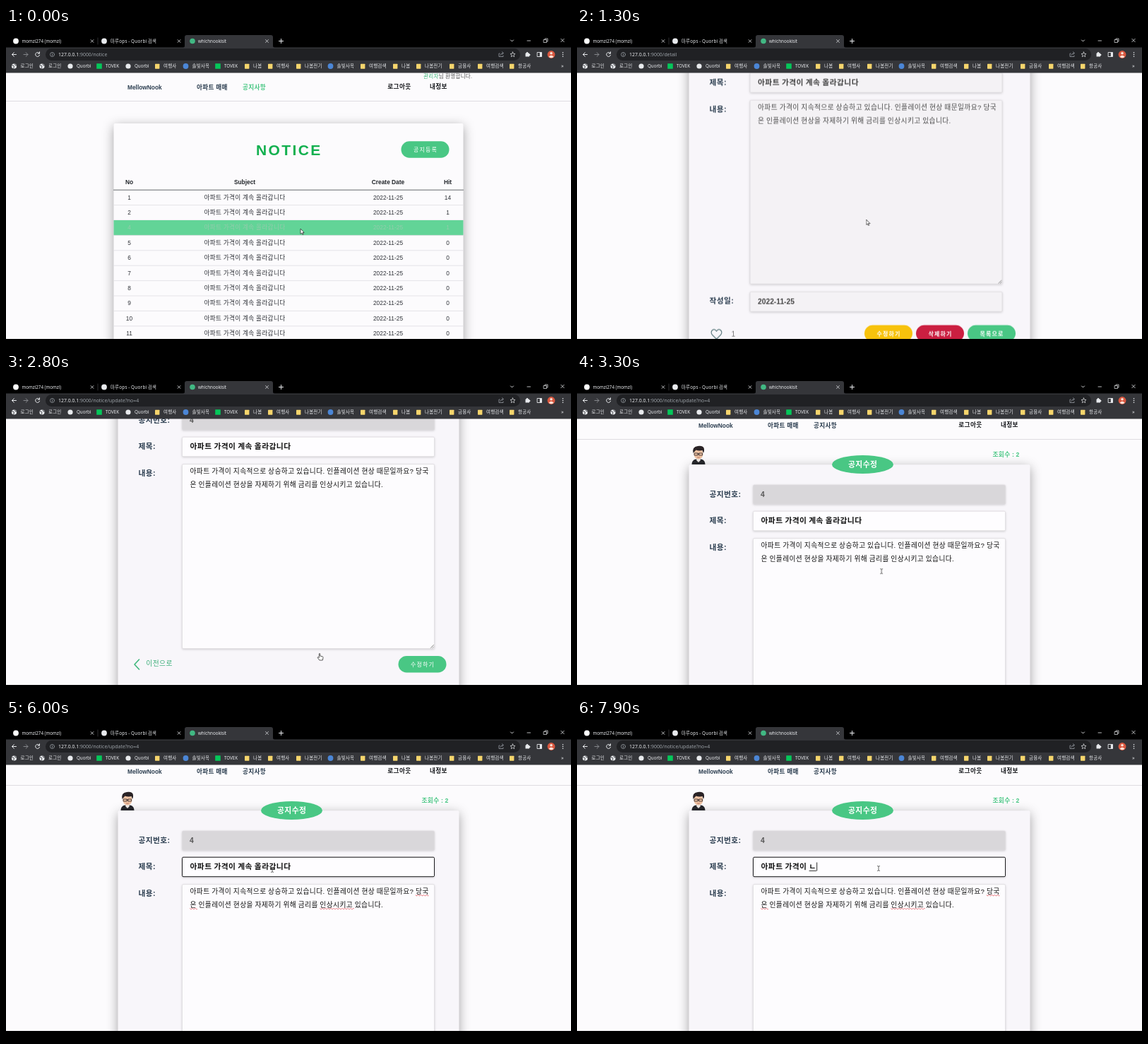
Animation of 800x450 px, one loop 8000 ms. Source, as an HTML page:

```html
<!DOCTYPE html>
<html lang="ko">
<head>
<meta charset="utf-8">
<title>Notice board</title>
<style>
html, body { margin: 0; width: 100%; height: 100%; overflow: hidden; background: #000; }
svg { display: block; }
text { font-family: "Liberation Sans", "Noto Sans CJK KR", "Noto Sans CJK JP", sans-serif; white-space: pre; }
.chrome text { font-family: "Noto Sans", "Noto Sans CJK KR", "Noto Sans CJK JP", sans-serif; }
.ko { letter-spacing: .04em; word-spacing: -.05em; }
.b { font-weight: 700; }
.mid { text-anchor: middle; }
.line { fill: none; stroke-linecap: round; stroke-linejoin: round; }
.card { filter: drop-shadow(0 4px 8px rgba(0, 0, 0, .36)); }
.field { stroke: #dddbdf; stroke-width: .8; filter: drop-shadow(0 1.5px 1.5px rgba(0, 0, 0, .16)); }
.focus { fill: none; stroke: #1c1c1e; stroke-width: 1; }

.list, .detail, .edit, .arrow, .hand, .beam, .title-focus, .body-focus, .caret, .advance, .cover, .jamo, .spell
  { animation: 8s step-end infinite; }
.list { animation-name: list; }
.detail { animation-name: detail; }
.edit { animation-name: edit; }
.arrow { animation-name: arrow; }
.hand { animation-name: hand; }
.beam { animation-name: beam; }
.title-focus { animation-name: title-focus; }
.body-focus { animation-name: body-focus; }
.caret { animation-name: caret; }
.advance { animation-name: advance; }
.cover { animation-name: cover; }
.jamo { animation-name: jamo; }
.spell { animation-name: spell; }
.scroll { animation: scroll 8s ease-in-out infinite; }
.cursor { animation: cursor 8s ease-in-out infinite; }

@keyframes list { 0% { opacity: 1 } 4.4%, 100% { opacity: 0 } }
@keyframes detail { 0% { opacity: 0 } 4.4% { opacity: 1 } 34.9%, 100% { opacity: 0 } }
@keyframes edit { 0% { opacity: 0 } 34.9%, 100% { opacity: 1 } }
@keyframes arrow { 0% { opacity: 1 } 23.7%, 100% { opacity: 0 } }
@keyframes hand { 0% { opacity: 0 } 23.7% { opacity: 1 } 37.4%, 100% { opacity: 0 } }
@keyframes beam { 0% { opacity: 0 } 37.4%, 100% { opacity: 1 } }
@keyframes title-focus { 0% { opacity: 0 } 48.7% { opacity: 1 } 62.4% { opacity: 0 } 71.2%, 100% { opacity: 1 } }
@keyframes body-focus { 0% { opacity: 0 } 62.4% { opacity: 1 } 71.2%, 100% { opacity: 0 } }
@keyframes spell { 0% { opacity: 0 } 63.7%, 100% { opacity: 1 } }
@keyframes jamo { 0% { opacity: 0 } 96.2%, 100% { opacity: 1 } }
@keyframes advance { 0% { transform: translateX(0) } 96.2%, 100% { transform: translateX(10.4px) } }
@keyframes caret {
  0% { opacity: 0 } 48.7% { opacity: 1 } 54% { opacity: 0 } 57% { opacity: 1 }
  62.4% { opacity: 0 } 79.9%, 100% { opacity: 1 }
}
@keyframes cover {
  0% { transform: translateX(0) }
  82.4% { transform: translateX(-10.4px) }
  83.7% { transform: translateX(-20.7px) }
  84.9% { transform: translateX(-31.1px) }
  86.2% { transform: translateX(-41.5px) }
  87.4% { transform: translateX(-51.9px) }
  88.7% { transform: translateX(-54.7px) }
  89.9% { transform: translateX(-65.1px) }
  91.2%, 100% { transform: translateX(-75.5px) }
}
@keyframes scroll {
  0%, 13.75% { transform: translateY(0) }
  17.5%, 34.89% { transform: translateY(-135px) }
  34.9%, 37.5% { transform: translateY(-116px) }
  41.25%, 100% { transform: translateY(-11px) }
}
@keyframes cursor {
  0%, 5% { transform: translate(417px, 284px) }
  9.4%, 11.2% { transform: translate(250.5px, 121px) }
  14.4%, 18.8% { transform: translate(409.5px, 271px) }
  24.4%, 36% { transform: translate(444px, 395px) }
  45%, 57.5% { transform: translate(424px, 215px) }
  61.9%, 66.9% { transform: translate(420px, 262px) }
  72.5%, 75.6% { transform: translate(377px, 212px) }
  79.4%, 100% { transform: translate(427px, 210px) }
}
</style>
</head>
<body>
<svg id="stage" width="800" height="450" viewBox="0 0 800 450"></svg>
<script>
const GREEN = '#49c784', INK = '#2c3e50', PAGE = '#fcfbfd', LIGHT = '#e8eaed', DIM = '#9aa0a6';
const TITLE = '아파트 가격이 계속 올라갑니다';
const BODY = [
  '아파트 가격이 지속적으로 상승하고 있습니다. 인플레이션 현상 때문일까요? 당국',
  '은 인플레이션 현상을 자제하기 위해 금리를 인상시키고 있습니다.'
];

// Hangul is set a little larger so that each syllable advances one em.
const text = (x, y, size, str, fill, cls = '', extra = '') => {
  const ko = /[\u3131-\ud7a3]/.test(str);
  return `<text x="${x}" y="${y}" font-size="${ko ? size * 1.04 : size}" fill="${fill}" class="${cls}${ko ? ' ko' : ''}" ${extra}>${str}</text>`;
};
const rect = (x, y, w, h, fill, r = 0, cls = '') =>
  `<rect x="${x}" y="${y}" width="${w}" height="${h}" rx="${r}" fill="${fill}" class="${cls}"/>`;
const dot = (x, y, r, fill) => `<circle cx="${x}" cy="${y}" r="${r}" fill="${fill}"/>`;
const line = (d, stroke, width = 1) => `<path class="line" d="${d}" stroke="${stroke}" stroke-width="${width}"/>`;
const group = (cls, ...parts) => `<g class="${cls}">${parts.join('')}</g>`;
const cross = (x, y, r) => line(`M${x - r} ${y - r}l${2 * r} ${2 * r}m0 ${-2 * r}l${-2 * r} ${2 * r}`, LIGHT, .8);
const pill = (x, y, fill, label, cls) =>
  rect(x, y, 68, 23.5, fill, 11.75) +
  `<text x="${x + 34.5}" y="${y + 14.9}" font-size="8" fill="#fff" class="mid ${cls}" letter-spacing="1.2">${label}</text>`;
const grip = (x, y) => line(`M${x - 5} ${y - 1}l4-4M${x - 2.5} ${y - 1}l1.5-1.5`, '#555', .7);

const globe = x => dot(x, 54, 3.6, LIGHT) + line(`M${x - 3} 53h2l1 2-1 2M${x + 1} 51l1 2h1.5`, '#35363a', .9);
const folder = x => rect(x - 3, 50.7, 6.4, 7, '#f6d56c', .6);
const plain = x => dot(x, 54, 3.6, LIGHT);
const green = x => rect(x - 3.8, 50.2, 7.6, 7.6, '#05c75a', .5);
const blue = x => dot(x, 54, 3.9, '#4b86d6');

function bookmarks() {
  const items = [
    [globe, 11.5, '로그인'], [globe, 51, '로그인'], [plain, 91, 'Quorbi'], [green, 132, 'TOVEK'],
    [plain, 173, 'Quorbi'], [folder, 214, '여행사'], [blue, 254.5, '솔빛사옥'], [green, 300, 'TOVEK'],
    [folder, 341, '나봄'], [folder, 374, '여행사'], [folder, 414, '나봄전기'], [blue, 459.5, '솔빛사옥'],
    [folder, 505, '여행검색'], [folder, 551, '나봄'], [folder, 584, '나봄전기'], [folder, 631, '금융사'],
    [folder, 671, '여행검색'], [folder, 716, '항공사']
  ];
  return items.map(([icon, x, name]) => icon(x) + text(x + 8.9, 56.4, 6.25, name, LIGHT)).join('') +
    text(786, 56, 7, '»', LIGHT);
}

function browser() {
  const url = (cls, path) => group(cls,
    `<text x="74" y="40" font-size="6.9" fill="${LIGHT}">127.0.0.1<tspan fill="${DIM}">:9000/${path}</tspan></text>`);
  return group('chrome',
    rect(0, 0, 800, 28, '#000'), rect(0, 27.5, 800, 36, '#35363a'),
    '<path d="M250 28q3 0 3-3V13q0-3 3-3h119q3 0 3 3v12q0 3 3 3z" fill="#35363a"/>',
    dot(14, 18.5, 3.9, '#fff'), text(22.5, 20.8, 6.2, 'momzi274 (momzi)', LIGHT), cross(122, 18.5, 1.9),
    line('M130 14v9', '#44464a', .7),
    dot(139, 18.5, 3.9, LIGHT), text(148, 20.8, 6.1, '마루ops - Quorbi 검색', LIGHT), cross(245, 18.5, 1.9),
    dot(264, 18.5, 3.8, '#41b883'), text(272, 20.8, 6.2, 'whichnookisit', LIGHT), cross(369.5, 18.5, 1.9),
    line('M386.5 18.5h6m-3-3v6', LIGHT, 1),
    line('M714.5 17l2 2 2-2', LIGHT, .9), line('M738 18h4.5', LIGHT, .8),
    line('M761.5 16.5h4v4h-4zM763 16.3v-1.3h4v4h-1.2', LIGHT, .7), cross(788, 17.5, 2.2),
    line('M14.5 37.5h-6m2.8-2.8l-2.8 2.8 2.8 2.8', LIGHT, 1),
    line('M25 37.5h6m-2.8-2.8l2.8 2.8-2.8 2.8', '#85878b', 1),
    line('M47 35.5a3 3 0 1 0 .6 2.8M47.5 33.8v2.4h-2.4', LIGHT, 1),
    rect(56, 29, 672, 17, '#202124', 8.5),
    line('M68.5 37.5a3 3 0 1 0-6 0 3 3 0 0 0 6 0M65.5 37.2v1.8M65.5 35.8v.1', DIM, .8),
    url('list', 'notice'), url('detail', 'detail'), url('edit', 'notice/update?no=4'),
    line('M699 36h-1v4.5h6V39M700 38.5q.5-3 4-3m-1.5-1.7l1.8 1.7-1.8 1.7', DIM, .8),
    line('M717.5 34l1 2.3 2.5.2-1.9 1.7.6 2.5-2.2-1.3-2.2 1.3.6-2.5-1.9-1.7 2.5-.2z', LIGHT, .7),
    rect(735.5, 35.5, 5.5, 5, LIGHT, .6), dot(738, 35.2, 1.3, LIGHT), dot(741.2, 38, 1.2, LIGHT),
    line('M752.5 34.5h6v6h-6z', LIGHT, .9), rect(755.8, 34.5, 2.7, 6, LIGHT),
    dot(772, 37.5, 5.4, '#d9573f'), dot(772, 35.8, 1.8, '#fbe3d8'),
    '<path d="M768.5 40.8q3.5-4 7 0-3.5 3-7 0" fill="#fbe3d8"/>',
    [34.8, 37.5, 40.2].map(y => dot(788.5, y, .8, LIGHT)).join(''),
    bookmarks());
}

function navbar() {
  return rect(0, 0, 800, 700, PAGE) +
    line('M0 103.5h800', '#dcdbde', .9) +
    text(172, 86.5, 8.35, 'MellowNook', INK, 'b') +
    text(270, 86.5, 8.3, '아파트 매매', INK, 'b') +
    text(335, 86.5, 8.3, '공지사항', INK, 'b') +
    group('list', rect(333, 77, 38, 13, PAGE), text(335, 86.5, 8.3, '공지사항', GREEN, 'b')) +
    text(591, 71.4, 7.25, `<tspan fill="#3db679">관리자</tspan>님 환영합니다.`, '#555') +
    text(540.3, 85.5, 8.35, '로그아웃', '#16181c', 'b') +
    text(600, 85.5, 8.25, '내정보', '#16181c', 'b');
}

function listPage() {
  const columns = [174.5, 338, 541, 625.5];
  const cells = (y, values, fill, cls) =>
    values.map((v, i) => text(columns[i], y, 8.35, v, fill, `mid ${cls}`)).join('');
  const rows = [1, 2, 4, 5, 6, 7, 8, 9, 10, 11].map((no, i) => {
    const top = 229.2 + 21.4 * i, hot = no === 4;
    const hits = no === 1 ? 14 : no < 5 ? 1 : 0;
    return (hot ? rect(152.5, top, 495, 21.4, '#62d497') : '') +
      line(`M152.5 ${top + 21.4}h495`, '#dfdee2', .8) +
      cells(top + 13.3, [no, TITLE, '2022-11-25', hits], hot ? '#93cbac' : '#2f3238', '');
  });
  return group('list',
    rect(152.5, 135, 495, 500, PAGE, 2, 'card'),
    text(354, 180, 21, 'NOTICE', '#12b04f', 'b', 'letter-spacing="2.4"'),
    pill(559.5, 160.3, GREEN, '공지등록', ''),
    cells(221.3, ['No', 'Subject', 'Create Date', 'Hit'], '#22262b', 'b'),
    ...rows, line('M152.5 229.2h495', '#65686c', 1));
}

const avatar = () =>
  '<path d="M162.5 139q0-6.5 6-7.5h7q6 1 6 7.5z" fill="#26272c"/>' +
  '<path d="M169 130h6l-.5 3.5-2.5 2.5-2.5-2.5z" fill="#f3efec"/>' +
  '<ellipse cx="172" cy="124" rx="6.6" ry="7.6" fill="#efc3a3"/>' +
  '<path d="M164.5 123q-2-9 6.5-10 8-1 9 4 .5 3-1 6l-1.5-4q-5 1-9-.5z" fill="#2a2326"/>' +
  line('M166.5 123h4.5v3h-4.5zM173 123h4.5v3h-4.5zM171 124h2', '#2a2326', .8) +
  line('M170.5 129q1.5 .8 3 0', '#a5584c', .7);

const shell = hits => avatar() +
  text(588.5, 127.8, 8.4, `조회수 : ${hits}`, GREEN, 'b') +
  rect(158.5, 139.3, 483, 560, '#f8f6fa', 2, 'card');
const label = (y, str) => text(187.5, y, 10.3, str, INK, 'b');
const lines = (x, y, fill) => BODY.map((s, i) => text(x, y + 19 * i, 9.37, s, fill)).join('');

function detailPage() {
  const tint = '#f4f2f5';
  return group('detail', shell(1),
    text(190.5, 129.5, 10.4, '공지번호 : 4', GREEN, 'b'),
    label(185, '제목:'), rect(245, 167.7, 357, 27.8, tint, 1.5, 'field'),
    text(256, 185, 10.37, TITLE, '#444', 'b'),
    label(222.8, '내용:'), rect(245, 206.5, 357, 260, tint, 1.5, 'field'),
    lines(256, 219.8, '#4a4a4a'), grip(602, 466.5),
    label(494, '작성일:'), rect(245, 477.7, 357, 27.8, tint, 1.5, 'field'),
    text(256, 495, 10.27, '2022-11-25', '#444', 'b'),
    line('M197.5 544.5l-6-6q-3-4 .5-7 3.5-1.8 5.5 2 2-3.8 5.5-2 3.5 3 .5 7z', '#58777b', 1.1),
    text(218.5, 540.6, 10.3, '1', '#777'),
    pill(407, 524.7, '#f7c20c', '수정하기', 'b'),
    pill(480, 524.7, '#cb1f41', '삭제하기', 'b'),
    pill(553, 524.7, GREEN, '목록으로', 'b'));
}

function editPage() {
  const wave = (x, y, w) => {
    let d = `M${x} ${y}`;
    for (let i = 0; i < w / 2; i++) d += `l1 ${i % 2 ? -1 : 1}h1`;
    return line(d, '#e0444c', .75);
  };
  const end = 404;
  return group('edit', shell(2),
    `<ellipse cx="404.5" cy="139" rx="43.5" ry="13" fill="${GREEN}"/>`,
    text(404.7, 142.8, 10.4, '공지수정', '#fff', 'b mid'),
    label(185, '공지번호:'), rect(249.5, 168, 357, 27, '#d9d7da', 1.5, 'field'),
    text(260, 185, 10.27, '4', '#555', 'b'),
    label(222, '제목:'), rect(249.5, 205.2, 357, 27.5, '#fefdff', 1.5, 'field'),
    text(260.5, 222, 10.37, TITLE, '#111', 'b'),
    '<svg x="251" y="207" width="354" height="24" viewBox="251 207 354 24">',
    group('cover', rect(end, 207, 200, 24, '#fefdff'),
      group('advance', group('caret', rect(end + .3, 212.5, .9, 12, '#111')))),
    group('jamo', text(328.5, 222, 10.37, 'ㄴ', '#111', 'b'), line('M329 224.5h9.5', '#111', .8)),
    '</svg>',
    group('title-focus', rect(249.5, 205.2, 357, 27.5, 'none', 1.5, 'focus')),
    label(260.3, '내용:'), rect(249.5, 243.7, 357, 260.8, '#fdfcfe', 1.5, 'field'),
    lines(260.5, 256.7, '#111'), grip(606.5, 504.5),
    group('spell', wave(580, 258.7, 18), wave(260.5, 277.7, 9), wave(444.5, 277.7, 47)),
    group('body-focus', rect(249.5, 243.7, 357, 260.8, 'none', 1.5, 'focus')),
    line('M188.5 520l-6.5 7 6.5 7', '#3fb77c', 1.6),
    text(198.3, 529.3, 9.4, '이전으로', '#3aae78'),
    pill(555.5, 515, GREEN, '수정하기', ''));
}

function pointer() {
  const shape = (cls, d) =>
    `<path class="${cls}" d="${d}" fill="#fff" stroke="#333" stroke-width=".8" stroke-linejoin="round"/>`;
  return group('cursor',
    shape('arrow', 'M0 0V7.5L1.8 6 3 8.5 4.2 8 3 5.5H5.2Z'),
    shape('hand', 'M-.7 1q.7-1.5 1.4 0v3l3.5 .8q1 .4 .8 1.6L4.3 10H-.2L-2.8 6.5q-.2-1.2 1-.8l1.1 .8z'),
    group('beam', line('M-1.5-3.5Q0-3.5 0-2.5V2.5Q0 3.5-1.5 3.5M1.5-3.5Q0-3.5 0-2.5M0 2.5Q0 3.5 1.5 3.5', '#444', .8)));
}

document.getElementById('stage').innerHTML =
  group('scroll', navbar(), listPage(), detailPage(), editPage()) +
  browser() + pointer() + rect(0, 440, 800, 10, '#000');
</script>
</body>
</html>
```
